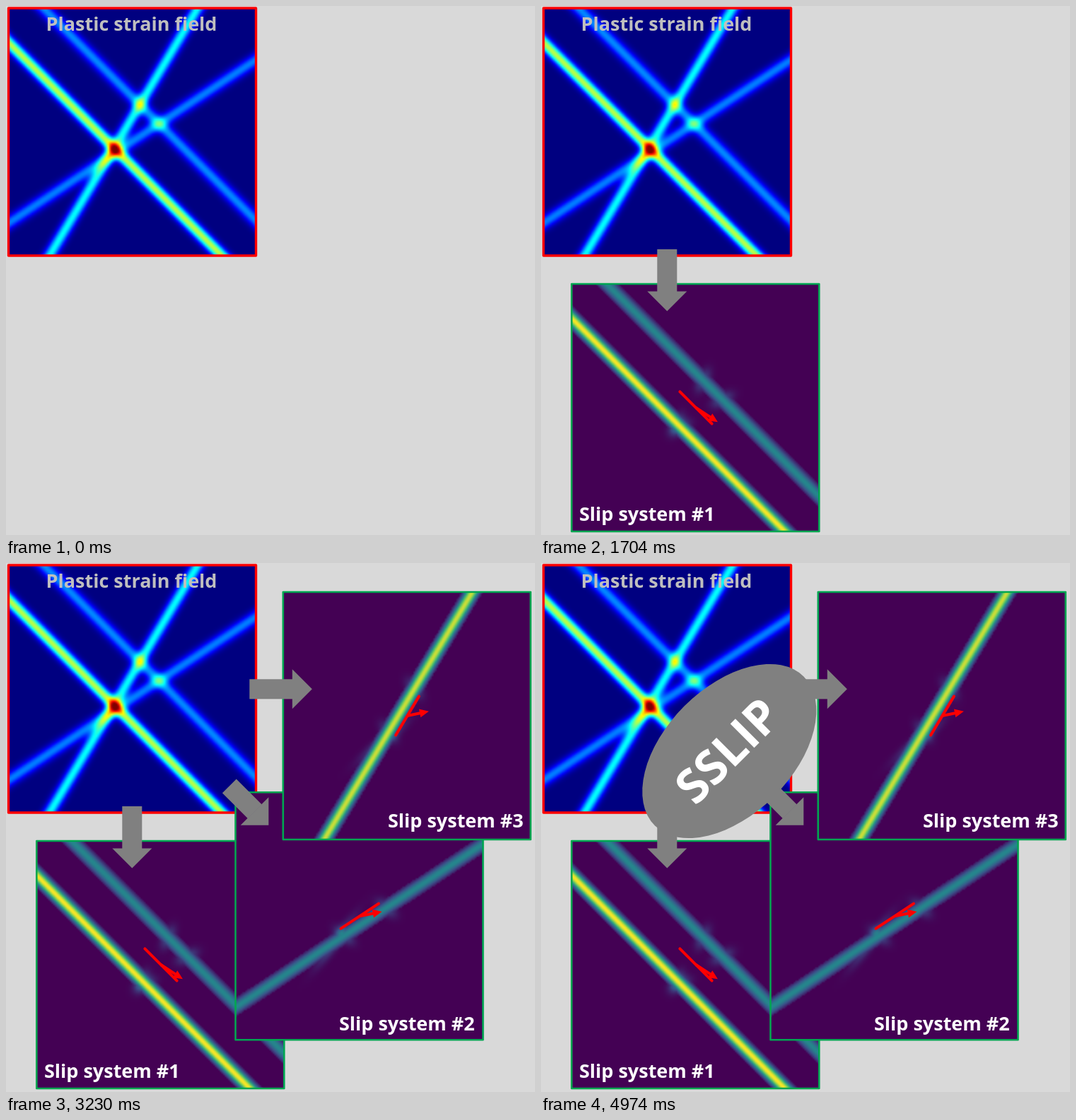
Recreate the animation shown at these times as an HTML page with a canvas. Size 748 by 748 pixels, loop 5410 ms.

```html
<!DOCTYPE html>
<html>
<head>
<meta charset="utf-8">
<style>
html, body { margin: 0; width: 100%; height: 100%; overflow: hidden; background: #d9d9d9; }
canvas { display: block; width: 748px; height: 748px; }
</style>
</head>
<body>
<canvas id="stage" width="748" height="748"></canvas>
<script>
const ctx = document.getElementById('stage').getContext('2d');
const LOOP = 5410, FIRST = 1050, STEP = 1090;
const SIZE = 350, CELLS = 150;
const GRAY = '#808080', RED = '#f00', GREEN = '#00a651';
const ORIGIN = { x: 3.5, y: 3 };

const clamp = v => Math.max(0, Math.min(1, v));
const sum = (list, f) => list.reduce((total, item) => total + f(item), 0);

const jet = v => [3, 2, 1].map(k => 255 * clamp(1.5 - Math.abs(4 * clamp(v) - k)));

const STOPS = [[68, 1, 84], [59, 82, 139], [33, 145, 140], [94, 201, 98], [253, 231, 37]];
function viridis(v) {
  const p = 4 * clamp(v), i = Math.min(3, Math.floor(p));
  return STOPS[i].map((c, k) => c + (STOPS[i + 1][k] - c) * (p - i));
}

// Slip bands: straight lines with a Gaussian profile, in field coordinates.
function makeBand(x1, y1, x2, y2, strain, slip, sigma) {
  const angle = Math.atan2(y2 - y1, x2 - x1);
  const c = Math.cos(angle), s = Math.sin(angle);
  const profile = (x, y, spread = 1) => {
    const d = ((x - x1) * s - (y - y1) * c) / (sigma * spread);
    return Math.exp(-d * d / 2);
  };
  return { angle, strain, slip, profile };
}
const BANDS = [
  makeBand(5, 53, 304, 352, 0.56, 1, 6),
  makeBand(55, 5, 352, 302, 0.26, 0.46, 6.4),
  makeBand(5, 306, 352, 77, 0.25, 0.46, 6.3),
  makeBand(61.5, 353, 271, 3, 0.38, 0.93, 6)
];

const totalStrain = (x, y) => sum(BANDS, b => b.strain * b.profile(x, y));

// One system keeps its own bands, plus a faint trace where others cross them.
function slipValue(own) {
  const others = BANDS.filter(b => !own.includes(b));
  return (x, y) => {
    const v = sum(own, b => b.slip * b.profile(x, y));
    const near = sum(own, b => b.profile(x, y, 1.7));
    const trace = 0.25 * near * sum(others, b => b.profile(x, y));
    return Math.max(v > 0.09 ? v : 0, trace);
  };
}

function makeMap(value, colour) {
  const map = document.createElement('canvas');
  map.width = map.height = CELLS;
  const g = map.getContext('2d'), img = g.createImageData(CELLS, CELLS);
  const at = i => (i + 0.5) * SIZE / CELLS;
  for (let j = 0; j < CELLS; j++) {
    for (let i = 0; i < CELLS; i++) {
      const v = value(ORIGIN.x + at(i), ORIGIN.y + at(j));
      img.data.set([...colour(v), 255], (j * CELLS + i) * 4);
    }
  }
  g.putImageData(img, 0, 0);
  return map;
}

function drawPanel(map, x, y, edge, width) {
  ctx.drawImage(map, x, y, SIZE, SIZE);
  ctx.strokeStyle = edge;
  ctx.lineWidth = width;
  ctx.lineJoin = 'round';
  ctx.strokeRect(x, y, SIZE, SIZE);
}

function text(str, x, y, colour = '#fff', size = 27) {
  ctx.font = `bold ${size}px "Open Sans", "Noto Sans", sans-serif`;
  ctx.fillStyle = colour;
  ctx.fillText(str, x, y);
}

function placed(x, y, angle, draw) {
  ctx.save();
  ctx.translate(x, y);
  ctx.rotate(angle);
  draw();
  ctx.restore();
}

// An arrow ending at the local origin; half is the half width of its head.
function arrow(length, head, half, shaft, colour) {
  ctx.fillStyle = colour;
  ctx.fillRect(-length, -shaft, length - head + 0.5, 2 * shaft);
  ctx.beginPath();
  ctx.moveTo(0, 0);
  ctx.lineTo(-head, -half);
  ctx.lineTo(-head, half);
  ctx.fill();
}

// Plane trace and slip direction, both from the panel's middle.
function drawSlipMark(x, y, traceAngle, slipAngle, length) {
  placed(x, y, traceAngle, () => {
    ctx.strokeStyle = RED;
    ctx.lineWidth = 4;
    ctx.lineCap = 'round';
    ctx.beginPath();
    ctx.moveTo(-32, 0);
    ctx.lineTo(32, 0);
    ctx.stroke();
  });
  placed(x, y, slipAngle, () => {
    ctx.translate(length, 0);
    arrow(length, 13, 6, 2, RED);
  });
}

const field = makeMap(totalStrain, jet);

function makeSystem(n, x, y, own, slipAngle, slipLength, labelX, labelY, pointer) {
  const map = makeMap(slipValue(own), viridis);
  return () => {
    drawPanel(map, x, y, GREEN, 2.6);
    drawSlipMark(x + SIZE / 2 + 0.7, y + SIZE / 2, own[0].angle, slipAngle, slipLength);
    text(`Slip system #${n}`, labelX, labelY);
    placed(pointer.x, pointer.y, pointer.angle, () => arrow(pointer.length, 28, 28, 14, GRAY));
  };
}

function drawMethod() {
  placed(266.3, 266, -Math.PI / 4, () => {
    ctx.fillStyle = GRAY;
    ctx.beginPath();
    ctx.ellipse(0, 0, 149, 90, 0, 0, 2 * Math.PI);
    ctx.fill();
    ctx.textAlign = 'center';
    text('SSLIP', -1.5, 21.5, '#fff', 67);
  });
}

const LAYERS = [
  makeSystem(1, 43.3, 393, [BANDS[0], BANDS[1]], 0.58, 37, 54, 728,
    { x: 178.3, y: 431.5, angle: Math.PI / 2, length: 87.5 }),
  makeSystem(2, 324.5, 324.3, [BANDS[2]], -0.2, 32, 471, 661,
    { x: 371.3, y: 370.8, angle: Math.PI / 4, length: 78.5 }),
  makeSystem(3, 391.8, 41, [BANDS[3]], -0.2, 31, 540, 374,
    { x: 432.8, y: 178.3, angle: 0, length: 88.5 }),
  drawMethod
];

function frame(now) {
  const t = now % LOOP;
  ctx.fillStyle = '#d9d9d9';
  ctx.fillRect(0, 0, 748, 748);
  drawPanel(field, ORIGIN.x, ORIGIN.y, RED, 3.4);
  text('Plastic strain field', 56.5, 34.5, '#bfbfbf');
  LAYERS.forEach((draw, i) => { if (t >= FIRST + i * STEP) draw(); });
  requestAnimationFrame(frame);
}
frame(performance.now());
</script>
</body>
</html>
```
